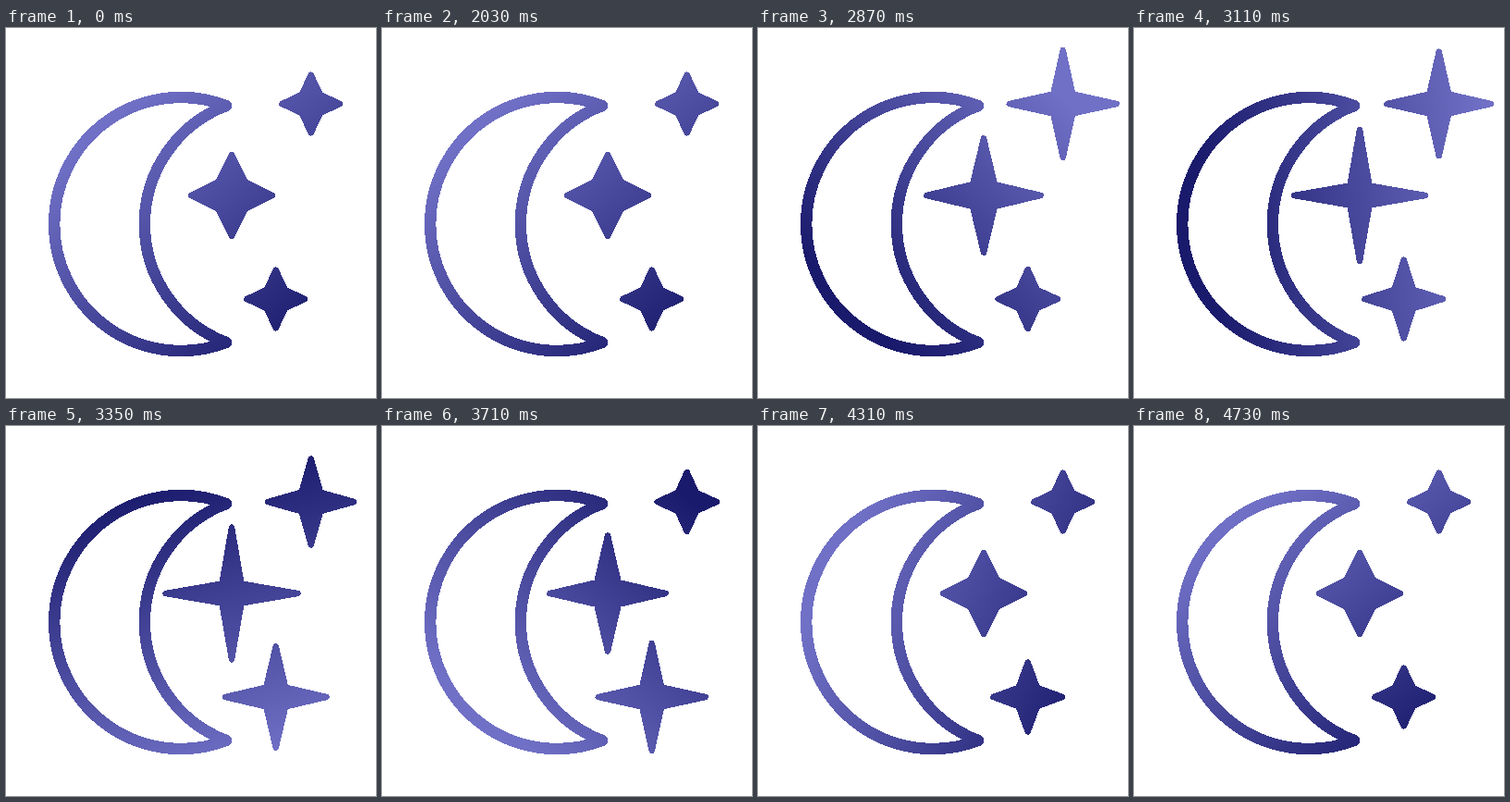
Animation, 400 px wide and 400 px high, one loop 5030 ms. Source, as an HTML page without scripts:

```html
<!DOCTYPE html>
<html lang="en">
<head>
<meta charset="utf-8">
<title>Moon and stars</title>
<style>
  html, body { margin: 0; width: 100%; height: 100%; overflow: hidden; background: #fff; }
  svg { display: block; width: 100%; height: 100%; }

  .moon, .star { stroke: #fff; stroke-linejoin: round; shape-rendering: crispEdges; }
  .moon { fill: none; stroke-width: 12.4; }

  .star {
    --rest: path("M0-31.3 10-10 31.3 0 10 10 0 31.3-10 10-31.3 0-10-10Z");
    --peak: path("M0-58 10.5-10.5 58 0 10.5 10.5 0 58-10.5 10.5-58 0-10.5-10.5Z");
    fill: #fff;
    stroke-width: 6.4;
    d: var(--rest);
    animation: twinkle 5.03s var(--start) infinite;
  }
  .star.big {
    --rest: path("M0-44 14.5-14.5 44 0 14.5 14.5 0 44-14.5 14.5-44 0-14.5-14.5Z");
    --peak: path("M0-71.5 10.5-10.5 71.5 0 10.5 10.5 0 71.5-10.5 10.5-71.5 0-10.5-10.5Z");
  }

  /* the tips stretch, hold, then draw back */
  @keyframes twinkle {
    0%, 35%, 100% { d: var(--rest); animation-timing-function: cubic-bezier(.333, 0, .667, 1); }
    14%, 19% { d: var(--peak); animation-timing-function: cubic-bezier(.333, 0, .667, 1); }
  }
</style>
</head>
<body>
<svg viewBox="0 0 400 400">
  <defs>
    <!-- light at the left end; makes one full turn per loop -->
    <linearGradient id="sweep" gradientUnits="userSpaceOnUse" x1="75" y1="205" x2="395" y2="205">
      <stop offset="0" stop-color="#7070c6"/>
      <stop offset="1" stop-color="#1a1a6c"/>
      <animateTransform attributeName="gradientTransform" type="rotate" dur="5.03s" repeatCount="indefinite"
        calcMode="spline" keyTimes="0;.4036;.666;.9404;1"
        keySplines="0 0 1 1;.5 .3 .9 .5;.3 .4 .6 .9;0 0 1 1"
        values="-310 235 205;-310 235 205;-105 235 205;50 235 205;50 235 205"/>
    </linearGradient>

    <mask id="shapes" maskUnits="userSpaceOnUse" x="0" y="0" width="400" height="400">
      <path class="moon" d="M238 84A137 137 0 1 0 238 340A137 137 0 0 1 238 84Z"/>
      <path class="star" transform="translate(329.7 82)" style="--start: 2.03s"/>
      <path class="star big" transform="translate(244 181)" style="--start: 2.45s"/>
      <path class="star" transform="translate(291.7 293)" style="--start: 2.8s"/>
    </mask>
  </defs>
  <rect width="400" height="400" fill="url(#sweep)" mask="url(#shapes)"/>
</svg>
</body>
</html>
```
